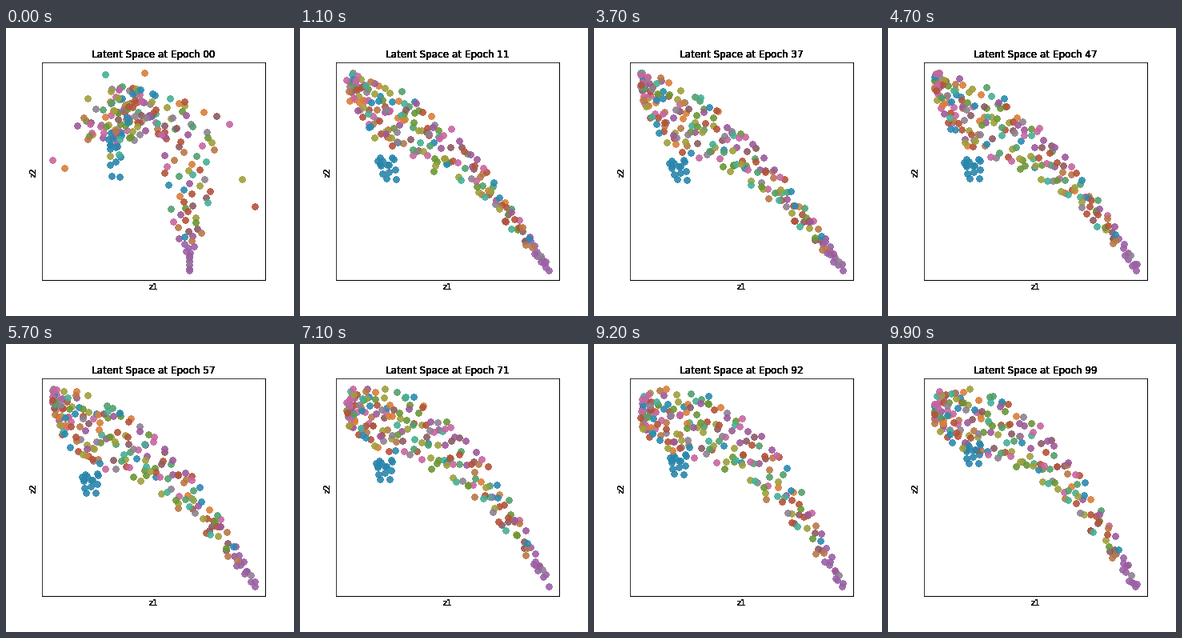
A matplotlib script for the animation above (10 s loop, 360x360 px).

```python
import numpy as np
import matplotlib.pyplot as plt
from matplotlib.animation import FuncAnimation

SIZE, EPOCHS, STEP = 360, 100, 100
N_BAND, N_BLUE = 200, 15
LEFT, RIGHT, TOP, BOTTOM = 58, 311, 56.5, 303
SETTLE = 20  # epochs until the cloud has become a band
PALETTE = ["#8c5a62", "#d97f3a", "#45b096", "#9c5a9a", "#9f9f3c", "#c766a0",
           "#6a9636", "#8d8190", "#b4533a", "#2a8bb0", "#b87848", "#52a06c"]
BLUE, PINK, PURPLE = "#2a86ac", "#c766a0", "#9a62a6"
rng = np.random.default_rng(7)


def ramp(e, start, end):
    k = np.clip((e - start) / (end - start), 0, 1)
    return k * k * (3 - 2 * k)


def fit(v, lo, hi):
    return lo + (v - v.min()) * (hi - lo) / (v.max() - v.min())


def upper(s, e):
    """Top edge at s = 0..1: a power curve that bulges around epoch 84."""
    power = 1.75 + .65 * ramp(e, 35, 75) + 1.4 * np.exp(-((e - 84) / 7) ** 2)
    head = 20 * ramp(e, 55, 72) * np.exp(-s / .03)
    return 60 + 232 * s ** power + head


def lower(s, e):
    """Bottom edge: a steep drop at the head, then a power curve."""
    late = ramp(e, 55, 73)
    start, drop = 80 + 25 * late, 75 - 43 * late
    power = 1.9 + .4 * ramp(e, 23, 50)
    return (start + drop * (1 - np.exp(-s / .08))
            + (BOTTOM - start - drop) * s ** power)


# Each point keeps its place along (q) and across (u) the band.
q = (np.arange(N_BAND) + rng.uniform(0, 1, N_BAND)) / N_BAND
u = (np.arange(N_BAND) * .618 + rng.uniform(-.12, .12, N_BAND)) % 1
phase = rng.uniform(0, 2 * np.pi, (2, N_BAND))
rate = rng.uniform(.15, .4, N_BAND)
blue_x, blue_y = rng.uniform(-1, 1, (2, N_BLUE))


def band(e):
    s = np.clip(q ** 1.5 + .012 * np.sin(rate * e + phase[0]), 0, 1)
    v = np.clip(u + .06 * np.sin(rate * e + phase[1]), 0, 1)
    top, low = upper(s, e), lower(s, e)
    return np.array([LEFT + (RIGHT - LEFT) * s, top + v * (low - top)])


def blue_band(e):
    slant = 8 * (1 - ramp(e, 30, 57))
    y = lower(.19, e) + 22 * (1 - ramp(e, 87, 98))
    return np.array([106 + 11 * blue_x + slant * blue_y * .6,
                     y + 16 * blue_y])


def start_cloud():
    """Round cloud, a sparse wide arch, and a funnel down to a short column."""
    x = rng.normal(160, 26, N_BAND)
    y = np.clip(rng.normal(107, 19, N_BAND), TOP, 168)
    arch = slice(0, N_BAND // 2, 6)
    x[arch] = np.linspace(LEFT, RIGHT, len(x[arch]))
    y[arch] = 105 + 70 * ((x[arch] - 180) / 130) ** 2
    y[arch] += rng.normal(0, 20, len(x[arch]))
    tail = q > .68
    s = (q[tail] - .68) / .32
    x[tail] = 229 + 40 * (2 * u[tail] - 1) * np.clip(1 - s / .88, 0, 1) ** .5
    y[tail] = 120 + (BOTTOM - 120) * s
    blue = np.array([137 + 9 * blue_x, 155 + 39 * blue_y])
    return np.hstack([[x, y], blue])


cloud = start_cloud()


def positions(e):
    left = (1 - min(e / SETTLE, 1)) ** 3
    x, y = cloud * left + np.hstack([band(e), blue_band(e)]) * (1 - left)
    points = np.column_stack([fit(x, LEFT, RIGHT), fit(y, TOP, BOTTOM)])
    return np.floor(points) + .5  # pixel centres give every dot one shape


def point_colors():
    colors = list(rng.choice(PALETTE, N_BAND))
    for i in range(N_BAND):
        if q[i] < .22 and u[i] < .45 and rng.random() < .35:
            colors[i] = PINK
        elif q[i] > .94 and rng.random() < .45:
            colors[i] = PURPLE
    return np.array(colors + [BLUE] * N_BLUE)


fig = plt.figure(figsize=(SIZE / 72, SIZE / 72), dpi=72, facecolor="white")
ax = fig.add_axes([45 / SIZE, 45 / SIZE, 279 / SIZE, 272 / SIZE])
ax.set(xlim=(45, 324), ylim=(315, 43), xticks=[], yticks=[])
ax.spines[["right", "bottom"]].set_linewidth(1)


def heavy_text(x, y, text, size, **kw):
    """Stacked copies turn the soft glyph edges solid."""
    return [fig.text(x / SIZE, 1 - y / SIZE, text, fontsize=size, ha="center",
                     family="DejaVu Sans", color="black", **kw)
            for _ in range(10)]


title = heavy_text(184.5, 37, "", 12)
heavy_text(184, 327, "z1", 10)
heavy_text(35, 180.5, "z2", 10, rotation=90, va="center")

order = rng.permutation(N_BAND + N_BLUE)
dots = ax.scatter(*positions(0)[order].T, s=56, c=point_colors()[order],
                  alpha=.9, linewidths=0, antialiaseds=False)


def update(epoch):
    dots.set_offsets(positions(epoch)[order])
    for t in title:
        t.set_text(f"Latent Space at Epoch {epoch:02d}")
    return [dots, *title]


anim = FuncAnimation(fig, update, frames=EPOCHS, interval=STEP,
                     repeat=True, repeat_delay=0, blit=False)
plt.show()
```
